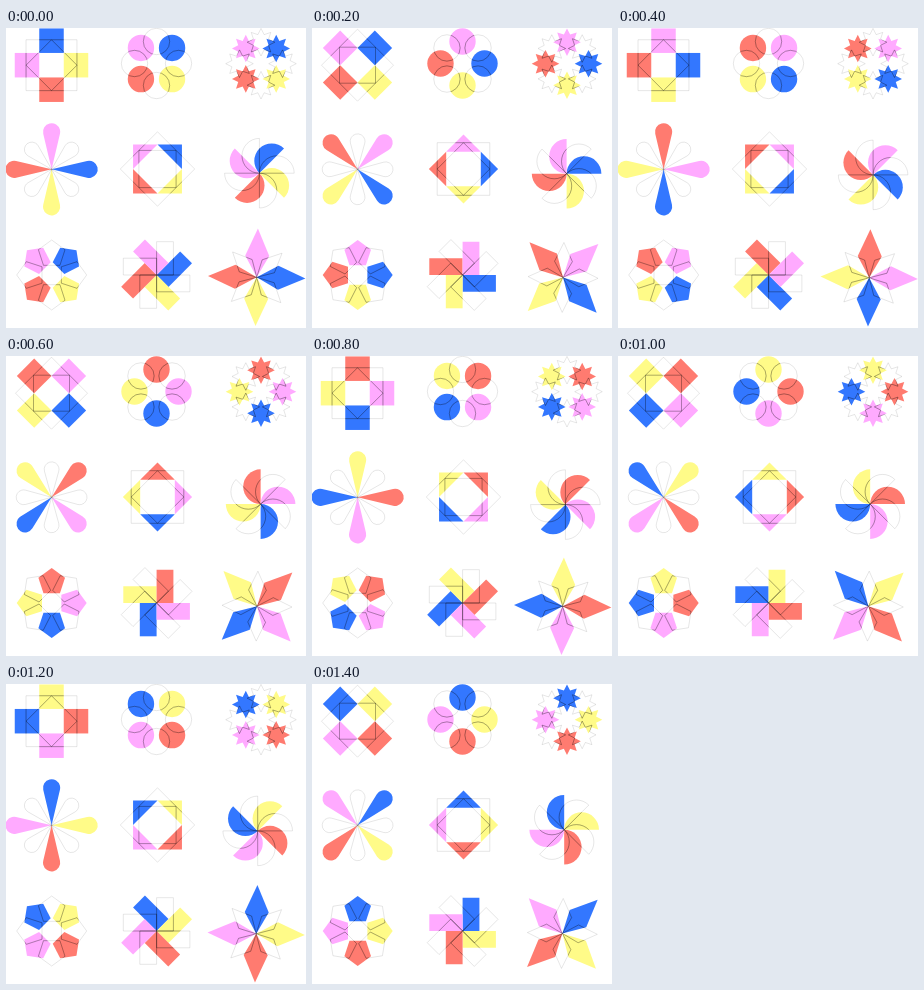
Recreate the animation shown at these times as an HTML page with a canvas. Size 300 by 300 pixels, loop 1.6 s.

```html
<!DOCTYPE html>
<html lang="en">
<head>
<meta charset="utf-8">
<title>Turning rosettes</title>
<style>
html, body { margin: 0; width: 100%; height: 100%; overflow: hidden; background: #fff; }
canvas { display: block; }
</style>
</head>
<body>
<canvas id="stage" width="300" height="300"></canvas>
<script>
const ctx = document.getElementById('stage').getContext('2d');
const STEP = 200, STEPS = 8, TURN = Math.PI / 4;
const COLORS = ['#3377ff', '#fffb88', '#ff7b70', '#ffaaff'];

// Each petal is drawn pointing up from the rosette centre.
function poly(...pts) {
  const p = new Path2D();
  pts.forEach(([x, y]) => p.lineTo(x, y));
  p.closePath();
  return p;
}

function ring(n, cy, outer, inner = outer) {
  const pts = Array.from({ length: n }, (_, i) => {
    const a = i * 2 * Math.PI / n, r = i % 2 ? inner : outer;
    return [r * Math.sin(a), cy - r * Math.cos(a)];
  });
  return poly(...pts);
}

function disc(cy, r) {
  const p = new Path2D();
  p.arc(0, cy, r, 0, 2 * Math.PI);
  return p;
}

function drop(d, r) {
  const p = new Path2D(), a = Math.asin(r / d);
  p.moveTo(0, 0);
  p.arc(0, -d, r, Math.PI - a, a);
  p.closePath();
  return p;
}

function halfDisc(r) {
  const p = new Path2D();
  p.arc(0, -r, r, Math.PI / 2, Math.PI * 1.5);
  p.closePath();
  return p;
}

const block = (s, d) => poly([-s, -d - s], [s, -d - s], [s, s - d], [-s, s - d]);
const corner = h => poly([0, -h], [h / 2, -h / 2], [-h / 2, -h / 2]);
const kite = (h, w, d) => poly([0, 0], [-w, -d], [0, -h], [w, -d]);

// start: heading of the blue petal in eighths of a turn; lift: offset from the pivot;
// ghost: outline shape where it differs from the petal
const rosettes = [
  { x: 45.5, y: 37.2, start: 0, petal: block(12.25, 24.5), ghost: corner(36) },
  { x: 150.5, y: 35.5, start: 1, petal: disc(-22, 13.2) },
  { x: 255, y: 35.7, start: 1, petal: ring(16, -21.5, 13.8, 8.2) },
  { x: 45.6, y: 141.3, start: 2, petal: drop(37.5, 8.6), ghost: drop(28, 7.4) },
  { x: 151.5, y: 141, start: 1, petal: corner(34.6), ghost: corner(37.2) },
  { x: 253.4, y: 146.9, start: 1, lift: 1.7, petal: halfDisc(17.4) },
  { x: 45.7, y: 247, start: 1, petal: ring(5, -21, 14) },
  { x: 150.6, y: 247, start: 1, petal: poly([0, 0], [0, -33.3], [16.8, -33.3], [16.8, 0]) },
  { x: 250.7, y: 249.8, start: 2, lift: 0.5, tilt: 0.025, petal: kite(48.7, 12, 21.5), ghost: kite(35, 8.9, 16) }
];

function rotated(eighths, paint) {
  ctx.save();
  ctx.rotate(eighths * TURN);
  paint();
  ctx.restore();
}

function outlines(r, alpha) {
  ctx.strokeStyle = `rgba(0,0,0,${alpha})`;
  for (let i = 0; i < 4; i++) {
    rotated(r.start + 1 + i * 2, () => ctx.stroke(r.ghost || r.petal));
  }
}

function drawRosette(r, step) {
  ctx.save();
  ctx.translate(r.x, r.y);
  ctx.rotate(step * TURN + (r.tilt || 0));
  ctx.translate(0, -(r.lift || 0));
  COLORS.forEach((color, i) => rotated(r.start + i * 2, () => {
    ctx.fillStyle = color;
    ctx.fill(r.petal);
  }));
  outlines(r, 0.14);

  // Outlines read darker where they cross a filled petal.
  const filled = new Path2D();
  for (let i = 0; i < 4; i++) {
    const m = new DOMMatrix().rotate((r.start + i * 2) * 45);
    filled.addPath(r.petal, m);
  }
  ctx.clip(filled);
  outlines(r, 0.35);
  ctx.restore();
}

function draw(step) {
  ctx.fillStyle = '#fff';
  ctx.fillRect(0, 0, 300, 300);
  ctx.lineWidth = 0.7;
  rosettes.forEach(r => drawRosette(r, step));
}

const begin = performance.now();
let shown = -1;
function tick() {
  const step = Math.floor((performance.now() - begin) / STEP) % STEPS;
  if (step !== shown) draw(shown = step);
  requestAnimationFrame(tick);
}
tick();
</script>
</body>
</html>
```
